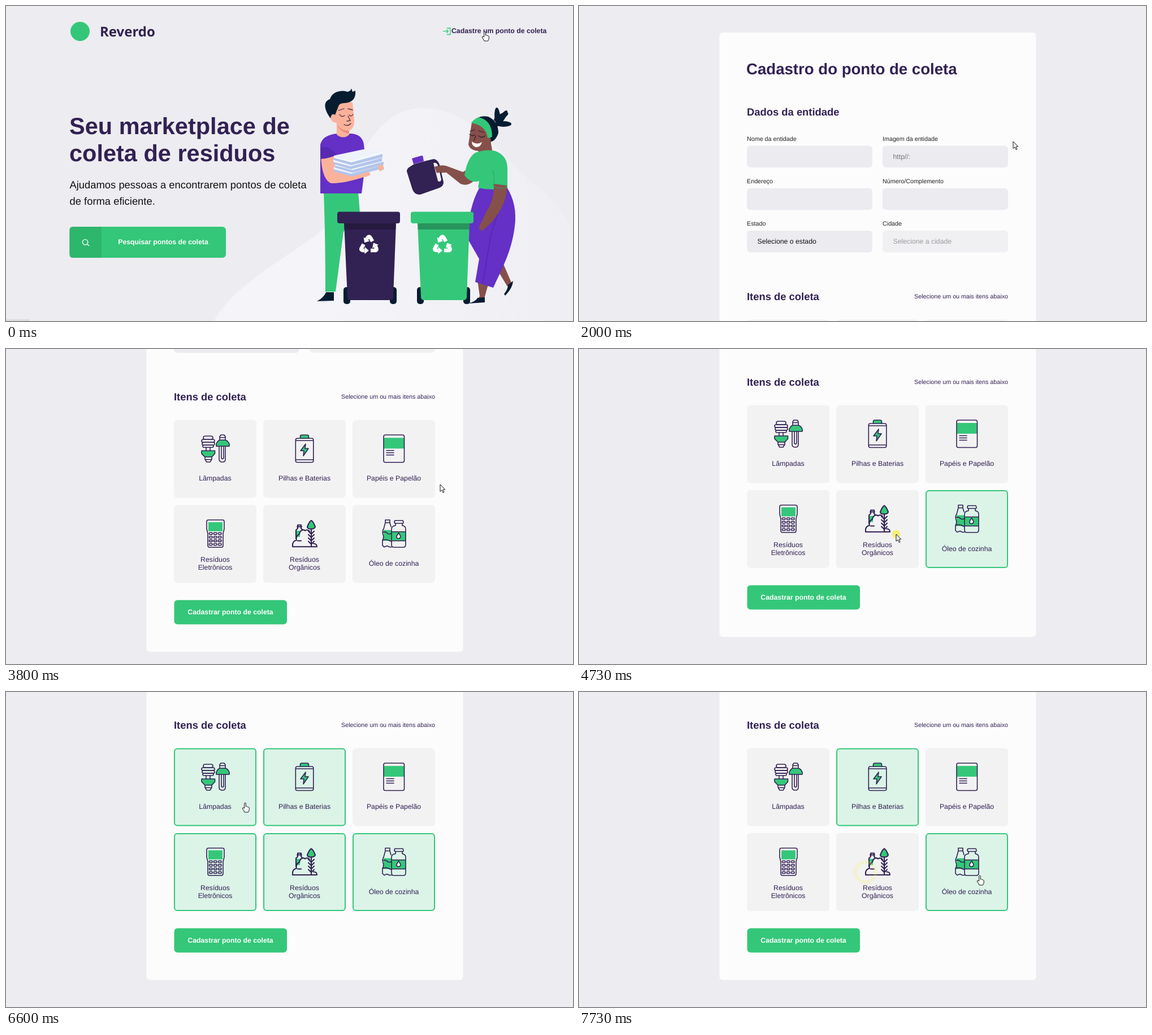
An HTML page that plays this animation: 1003x558 px, repeating every 8000 ms.

```html
<!DOCTYPE html>
<html lang="pt-BR">
<head>
<meta charset="utf-8">
<style>
html, body { margin: 0; width: 100%; height: 100%; overflow: hidden; background: #edecf1; }
svg { display: block; font-family: "Liberation Sans", Arial, sans-serif; text-rendering: geometricPrecision; }
.b { font-weight: bold; fill: #322153; }
.m { font-size: 12.27px; }
.s { font-size: 10.74px; }
.l { font-size: 18.4px; }
.white { fill: #fff; }
.mid { text-anchor: middle; }
.ink { fill: #322153; }
.green { fill: #34c779; }
.purple { fill: #6430c6; }
.skin { fill: #fbb29b; }
.brown { fill: #86504a; }
.dark { fill: #061c31; }
.line { fill: none; stroke: #322153; stroke-width: 1.6; stroke-linecap: round; stroke-linejoin: round; }
.line .fill { stroke: none; }
.line .thick { stroke-width: 2.1; }
.face { fill: none; stroke-width: 1.3; stroke-linecap: round; }
.card > rect { fill: #f2f2f3; stroke: #f2f2f3; stroke-width: 2; }
.card.on > rect { fill: #dcf4e8; stroke: #34c779; }
.field { fill: #ecebf0; }
</style>
</head>
<body>
<svg width="1003" height="558" viewBox="0 0 1003 558">
<defs>
  <linearGradient id="glow"><stop offset=".3" stop-color="#f5f4f8"/><stop offset="1" stop-color="#efeef3"/></linearGradient>
  <g id="turn">
    <path d="M3 9H10.5Q15 9 13 4.5L11.5 2" fill="none" stroke="#fff" stroke-width="6.6"/>
    <path d="M17 -1L6 5L8 -4.5Z" class="white"/>
  </g>
  <g id="bin">
    <rect x="-45" y="498" width="12" height="30" rx="5" class="dark"/>
    <rect x="37" y="498" width="12" height="30" rx="5" class="dark"/>
    <path d="M-44 384H48L43 515Q43 521 37 521H-32Q-38 521-38 515Z"/>
    <path d="M-44 384H48L47.5 396H-43.5Z" fill="#000" opacity=".25"/>
    <rect x="-56" y="364.5" width="111" height="20.5" rx="4"/>
    <g transform="translate(0 424)"><use href="#turn"/><use href="#turn" transform="rotate(120)"/><use href="#turn" transform="rotate(240)"/></g>
  </g>
  <g id="sheet">
    <path d="M580 266V274L611 283 666 269V258L611 274Z" fill="#b3c5ea"/>
    <path d="M580 266V270L611 278 666 263V258L611 274Z" fill="#f4f7fd"/>
    <path d="M580 266L632 255 666 258 611 274Z" fill="#eef2fb"/>
  </g>
</defs>

<g id="home">
  <path d="M368 558C400 500 470 462 550 405C615 350 620 186 735 181C830 180 870 265 940 320Q990 360 1003 410V558Z" fill="url(#glow)"/>
  <rect y="555" width="42" height="3" fill="#dcdcdf"/>
  <circle cx="131" cy="45" r="17" class="green"/>
  <text x="166" y="54" class="b" style="font:bold 24px 'Noto Sans',sans-serif">Reverdo</text>
  <path d="M780 39H786V50.5H780M773 44.7H782M779 41.5L782.3 44.7 779 48" fill="none" stroke="#34c779" stroke-width="1.3"/>
  <text x="788" y="48" class="b m">Cadastre um ponto de coleta</text>
  <g class="b" font-size="41.5"><text x="112" y="227">Seu marketplace de</text><text x="112" y="275">coleta de residuos</text></g>
  <g class="l" fill="#111"><text x="112.5" y="323">Ajudamos pessoas a encontrarem pontos de coleta</text><text x="112.5" y="352">de forma eficiente.</text></g>
  <rect x="112.5" y="391" width="276.5" height="55" rx="6" class="green"/>
  <path d="M169 391H118.5Q112.5 391 112.5 397V440Q112.5 446 118.5 446H169Z" fill="#2eb66d"/>
  <path d="M144 422L147 425M144.8 418.3A4.7 4.7 0 1 1 135.4 418.3A4.7 4.7 0 1 1 144.8 418.3" fill="none" stroke="#fff" stroke-width="1.4"/>
  <text x="278" y="422" class="b m mid" style="fill:#fff">Pesquisar pontos de coleta</text>

  <g id="man">
    <path d="M562 329H623L626 366 597 400 583 506H565Q565 410 562 329Z" class="green"/>
    <path d="M550 523Q562 517 566 507H580V522Z" class="dark"/>
    <path d="M585 226Q596 233 608 226Q630 226 633 245L636 278 629 332H556V246Q559 229 585 226Z" class="purple"/>
    <path d="M582 175Q600 165 613 171L616 201Q617 216 607 221V228Q597 237 585 228V207Q574 206 574 196Q576 187 582 191Z" class="skin"/>
    <path d="M585 210Q594 222 607 221V226Q592 224 585 210Z" fill="#ea8e7b"/>
    <path d="M574 199C562 182 561 169 573 165C577 152 592 148 604 152Q610 151 611 146L613 152 618 150Q620 171 598 172Q589 172 588 178L582 193Q576 188 574 199Z" class="dark"/>
    <path d="M590 192Q594 198 599 194M607 193Q611 197 614 192M598 210Q605 214 610 208M605 195L609 203 603 204M588 185L598 182M605 182L613 184" class="face" stroke="#4d3040"/>
    <path d="M557 266Q559 308 575 314Q600 315 645 299L640 290 589 296 582 264Z" class="skin"/>
    <path d="M556 252Q570 245 585 264Q571 270 557 271Z" fill="#562ab1"/>
    <use href="#sheet" y="19"/><use href="#sheet" y="12.5" x="2"/><use href="#sheet" y="6" x="-1"/><use href="#sheet" y="-1"/>
    <path d="M634 298Q642 288 643 300L636 303ZM658 284Q667 275 669 289L661 293Z" class="skin"/>
  </g>

  <g id="woman">
    <path d="M879 455L894 490 887 497 866 462ZM834 485L838 514 832 524 846 518 854 490Z" class="brown"/>
    <path d="M897 487Q896 500 883 513L881 510Q888 502 888 494ZM817 527Q832 523 834 517L847 516V525Z" class="dark"/>
    <path d="M838 321H886Q905 352 900 390C895 432 880 460 862 499L830 489 837 448 817 413Q817 358 838 321Z" class="purple"/>
    <path d="M884 323L858 405 843 492" fill="none" stroke="#4d24a0"/>
    <path d="M826 284L808 294 781 284Q772 280 758 285L762 296 779 295 804 315Q817 321 831 307ZM838 249L857 238 861 261Q850 268 835 260Z" class="brown"/>
    <path d="M830 260Q849 253 866 257Q887 265 887 288V322Q860 328 835 322L837 310Q822 315 811 300Q816 269 830 260Z" class="green"/>
    <path d="M863 315L886 318Q888 347 860 382L842 399 836 393 851 362Q864 342 863 315Z" class="brown"/>
    <path d="M861 290Q866 310 861 318Q876 327 887 320" fill="none" stroke="#28a763"/>
    <g class="dark"><ellipse cx="870" cy="196" rx="5" ry="16" transform="rotate(-4 870 208)"/><ellipse cx="870" cy="196" rx="5" ry="17" transform="rotate(35 868 208)"/><ellipse cx="880" cy="201" rx="14" ry="5" transform="rotate(-28 868 207)"/><ellipse cx="880" cy="209" rx="14" ry="5"/></g>
    <path d="M824 207Q835 192 853 196Q871 204 871 225Q865 242 855 240L824 207Z" class="dark"/>
    <path d="M824 206Q844 202 856 222L858 241Q853 254 840 257Q820 257 818 245Z" class="brown"/>
    <path d="M823 207Q828 200 836 197Q860 202 860 232L852 234Q850 212 823 207Z" class="green"/>
    <path d="M824 240Q833 247 842 241Q839 251 831 250Q824 248 824 240Z" class="white"/>
    <path d="M820 227Q825 232 829 228M836 230Q842 235 847 230M821 222L829 219M836 221L846 224M831 230L828 238" class="face" stroke="#381d2b"/>
  </g>

  <g id="jug">
    <path d="M718 270L735 265Q738 265 738 269L739 275 721 280Z" class="purple"/>
    <path d="M709 293Q709 288 714 285L722 280 744 274 757 271Q766 273 768 286L774 312Q774 319 767 322L733 334Q723 335 719 325Z" class="ink"/>
    <path d="M756 278Q763 276 765 285L770 307Q769 313 764 310Z" fill="#f1f0f5"/>
    <path d="M758 285Q766 281 772 286L771 294 762 296Z" class="brown"/>
  </g>
  <use href="#bin" x="642" class="ink"/>
  <use href="#bin" x="772" class="green"/>
</g>

<g id="form">
  <rect x="248.500" y="47" width="560" height="919" rx="6" fill="#fcfcfc"/>
  <text x="296" y="121" class="b" font-size="27.6">Cadastro do ponto de coleta</text>
  <text x="297" y="194" class="b l">Dados da entidade</text>
  <g id="fields"></g>
  <text x="297" y="520.5" class="b l">Itens de coleta</text>
  <text x="759" y="518" class="s ink" text-anchor="end">Selecione um ou mais itens abaixo</text>
  <g id="cards"></g>
  <rect x="297.5" y="874.5" width="199.5" height="43" rx="6" class="green"/>
  <text x="397" y="900" class="b m mid" style="fill:#fff">Cadastrar ponto de coleta</text>
</g>

<circle id="ring" fill="none" stroke="#f4ee4e" stroke-width="6"/>
<g id="pointer" fill="#fff" stroke="#111" stroke-linejoin="round">
  <path id="arrow" d="M0 0V12.5L3 9.8 5 14.500 7 13.6 5 9H8.8Z"/>
  <path id="hand" d="M-1.3 9V0Q0-2 1.3 0V6Q2.7 4.8 3.6 6.5Q5 5.6 5.7 7.2Q7.3 6.8 7.3 8.5V11Q7 14 5.5 16H-1Q-2 13-4.5 10Q-5 7.5-3 8Z"/>
</g>
</svg>
<script>
const $ = id => document.getElementById(id);

const fields = [
  ["Nome da entidade", ""], ["Imagem da entidade", "http//:", "#777"],
  ["Endereço", ""], ["Número/Complemento", ""],
  ["Estado", "Selecione o estado", "#111"], ["Cidade", "Selecione a cidade", "#9b9a9f"]
];
$("fields").innerHTML = fields.map(([label, value, color], i) => {
  const x = 297 + i % 2 * 240, y = 247.6 + (i >> 1) * 75.2;
  return `<text x="${x}" y="${y - 8.6}" class="s" fill="#222">${label}</text>
    <rect x="${x}" y="${y}" width="222" height="38.4" rx="6" class="field" opacity="${i == 5 ? .7 : 1}"/>
    <text x="${x + 18.5}" y="${y + 23.3}" class="m" fill="${color}">${value}</text>`;
}).join("");

const keys = [0, 1, 2, 3].map(r => [-10.5, -2.5, 5.5].map(x =>
  `<rect x="${x}" y="${-1.5 + r * 6.4}" width="5.5" height="3.3" rx="1"/>`).join("")).join("");

const items = [
  [["Lâmpadas"], `<rect x="-21" y="-22" width="17" height="6" rx="3"/><rect x="-24" y="-16" width="23" height="5" rx="2.5"/>
    <rect x="-23" y="-11" width="22" height="5" rx="2.5"/><rect x="-22" y="-6" width="19" height="4" rx="2"/><path d="M-16-2V4M-9-2V4"/>
    <path class="green" d="M-24 4H-.5V9L-6 15H-18L-24 9Z"/><path d="M-18 15V19L-15 24H-9L-6 19V15M-17 19.5H-7"/>
    <path d="M8-15V-21L10-24H16L18-21V-15M8-19.5H18M7-4V19Q7 24 13 24Q18 24 18 19V-4M11-4V17Q13 20 15 17V-4"/>
    <path class="green" d="M2-4V-8Q5-15 9-15H17Q22-15 25-8V-4Z"/>`],
  [["Pilhas e Baterias"], `<path class="green" d="M-7.5-18V-21Q-7.5-24-5-24H5Q7.5-24 7.5-21V-18"/>
    <rect x="-15.7" y="-18" width="31.5" height="42.5" rx="3"/><path d="M-15.5-14H15.5M-15.5 20H15.5"/>
    <path class="green" d="M2-8L-7 4H-1L-2 13 7 0H1Z"/>`],
  [["Papéis e Papelão"], `<rect class="green fill" x="-18" y="-19" width="36" height="19"/><rect x="-18" y="-24" width="36.5" height="48.5" rx="3"/>
    <path d="M-13 3.5H0M-13 7.5H0M-13 11.5H0"/>`],
  [["Resíduos", "Eletrônicos"], `<path d="M-15-21Q-15-24-12-24H13Q16-24 16-21V-8L14 0V21Q14 24.5 11 24.5H-10Q-13 24.5-13 21V0L-15-8Z"/>
    <rect class="green fill" x="-12" y="-20" width="25" height="16"/>${keys}`],
  [["Resíduos", "Orgânicos"], `<rect class="green fill" x="-15" y="-5" width="7" height="11"/>
    <path class="thick" d="M-15 9V-6L-12-9V-15H-6V-9L-3-6M-13-12H-5M-21 23.5V19Q-20 13-14 12C-16 5-11 2-9 1C-8-6-2-8 1-5Q5-8 9-4M-21 23.5H22Q22 18 16 18M-12 13H-6"/>
    <path class="green thick" d="M12-23Q15-22 19-12Q18-8 12-8Q5-8 5-12Q9-22 12-23Z"/>
    <path class="thick" d="M12-8V23M7-4L12 1 17-4M7 2L12 7 17 2M7 8L12 13 17 8M7 14L12 19 17 14"/>`],
  [["Óleo de cozinha"], `<path class="green fill" d="M-18-6H-4V13H-18ZM-4-3H21V13H-4Z"/>
    <path d="M-15-19L-18-8Q-21-4-19 2Q-17 7-20 12V21L-17 24-12 22-8 24H-4M-15-19H-7L-5-12M-15-24H-7V-19H-15ZM-19-2Q-14-4-11 0Q-8 2-4 0M-19 12Q-14 9-5 14"/>
    <path d="M2-23H16Q18-19 16-18H2Q0-20 2-23ZM3-18V-14Q-4-13-4-8V20Q-4 24.5 0 24.5H17Q21 24.5 21 20V-8Q21-13 15-14V-18M-4-3H21M-4 13H21"/>
    <path class="white" d="M8.5-1Q12 4 12 6Q11 9 8.500 9Q5 9 5 6Q5 4 8.500-1Z"/>`]
];
$("cards").innerHTML = items.map(([lines, icon], i) => {
  const x = 370 + i % 3 * 158, y = i < 3 ? 555.5 : 706;
  const base = y + (lines.length > 1 ? 101 : 107.5);
  return `<g class="card"><rect x="${x - 72}" y="${y + 1}" width="144" height="136" rx="5"/>
    <g class="line" transform="translate(${x} ${y + 50.5})">${icon}</g>
    ${lines.map((s, n) => `<text x="${x}" y="${base + n * 14}" class="m ink mid">${s}</text>`).join("")}</g>`;
}).join("");
const cards = [...document.querySelectorAll(".card")];

const PAGE_SWITCH = 1730;
// time, x, y of the pointer's hot spot
const route = [
  [0, 847, 46], [1730, 847, 46], [1960, 768, 240], [4000, 768, 240], [4240, 715, 325], [4380, 715, 325],
  [4660, 561, 328], [4900, 561, 328], [5120, 405, 330], [5400, 405, 330], [5780, 424, 193], [5960, 424, 196],
  [6120, 540, 200], [6310, 540, 200], [6520, 423, 197], [6740, 423, 197], [6940, 400, 318], [7140, 400, 318],
  [7340, 507, 319], [7470, 507, 319], [7700, 709, 326]
];
// press time, card toggled
const clicks = [[4270, 5], [4700, 4], [5200, 3], [5860, 0], [6170, 1], [6620, 0], [6990, 3], [7400, 4]];
const wheel = [2270, 2530, 2790, 3130, 3390, 3650];

const clamp = v => Math.min(1, Math.max(0, v));
const smooth = v => v * v * (3 - 2 * v);

function pointerAt(t) {
  const next = route.findIndex(p => p[0] > t);
  if (next < 0) return route.at(-1).slice(1);
  const [t0, x0, y0] = route[next - 1], [t1, x1, y1] = route[next];
  const k = smooth((t - t0) / (t1 - t0));
  return [x0 + (x1 - x0) * k, y0 + (y1 - y0) * k];
}

function draw() {
  const t = performance.now() % 8000;
  const onForm = t >= PAGE_SWITCH;
  $("home").style.display = onForm ? "none" : "";
  $("form").style.display = onForm ? "" : "none";

  const scroll = wheel.reduce((sum, at) => sum + 76 * smooth(clamp((t - at) / 250)), 0);
  $("form").setAttribute("transform", `translate(0 ${-scroll})`);
  cards.forEach((card, i) =>
    card.classList.toggle("on", clicks.filter(c => c[1] == i && t >= c[0] + 70).length % 2 == 1));

  const [x, y] = pointerAt(t);
  const press = clicks.findLast(c => c[0] <= t);
  const age = press ? t - press[0] : Infinity;
  const overCard = t > 4080 && y > 99 && y < 388 && (x - 297) % 158 < 146 && x < 759;
  const hand = !onForm || overCard && age > 110;
  $("pointer").setAttribute("transform", `translate(${x} ${y})`);
  $("hand").style.display = hand ? "" : "none";
  $("arrow").style.display = hand ? "none" : "";

  const ring = $("ring");
  ring.style.opacity = .8 * clamp(1 - age / 450);
  if (age < 450) {
    const [cx, cy] = pointerAt(press[0]);
    ring.setAttribute("cx", cx);
    ring.setAttribute("cy", cy);
    ring.setAttribute("r", 3 + age * .045);
  }
  requestAnimationFrame(draw);
}
draw();
</script>
</body>
</html>
```
